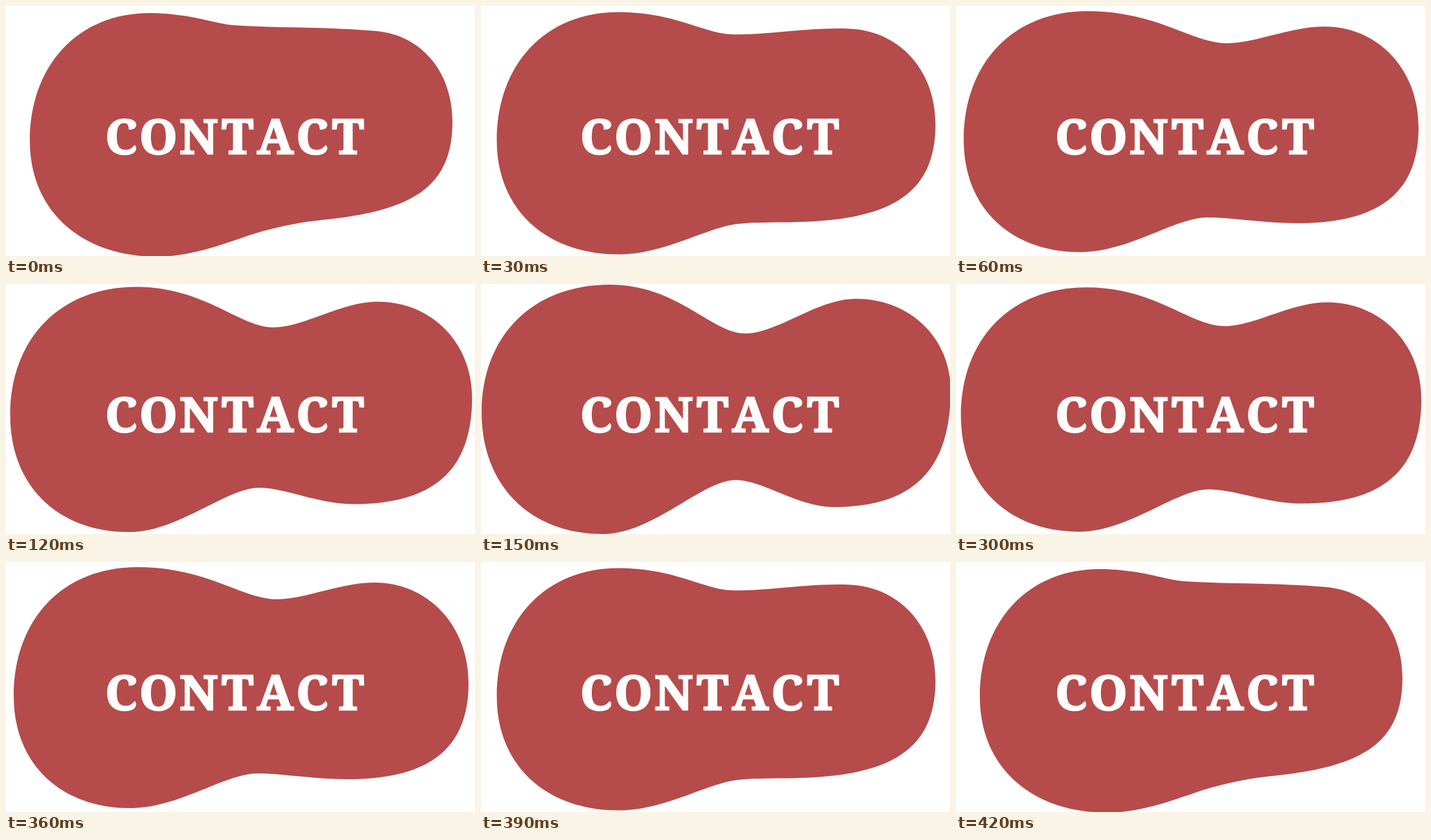
An HTML page that plays this animation: 728 px wide and 389 px high, repeating every 0.51 s.

```html
<!DOCTYPE html>
<html lang="en">
<head>
<meta charset="utf-8">
<title>Contact</title>
<style>
  html, body { margin: 0; width: 100%; height: 100%; overflow: hidden; background: #fff; }
  svg { display: block; width: 728px; height: 389px; }
  text {
    font: 900 75px "Noto Serif", serif; text-anchor: middle;
    fill: #fffefd; stroke: #fffefd; stroke-width: 2.4px;
  }
</style>
</head>
<body>
<svg viewBox="0 0 728 389">
  <path id="blob" fill="#b64b4b"/>
  <text x="179 236.5 299 359.5 418 475.5 531" y="230">CONTACT</text>
</svg>
<script>
const LOOP = 510, STEP = 30;
const blob = document.getElementById('blob');

// Clockwise from the left edge: travel direction, then how far the
// handles reach back and ahead as a share of the span to the neighbour.
const NODES = [
  { dir: [0, -1], back: .6, ahead: .6 },
  { dir: [1, 0], back: .6, ahead: .5 },
  { dir: [1, 0], back: .25, ahead: .29 },
  { dir: [1, 0], back: .35, ahead: .57 },
  { dir: [0, 1], back: .57, ahead: .68 },
  { dir: [-1, 0], back: .68, ahead: .37 },
  { dir: [-1, 0], back: .28, ahead: .25 },
  { dir: [-1, 0], back: .38, ahead: .6 }
];

// Relaxed, half pinched, fully pinched: x, y and an optional slope per node.
const POSES = [
  [[37, 210], [230, 11, .03], [355, 30, .07], [575, 39, .09], [693, 180], [490, 333, -.1], [400, 350, -.27], [235, 390]],
  [[12, 209], [204, 8], [421, 58], [572, 32], [718, 188], [530, 338], [390, 329], [193, 383]],
  [[1, 200], [200, 1], [410, 77], [582, 23], [729, 165], [548, 347], [395, 305], [189, 389]]
];

// Time in ms and position along the poses.
const KEYS = [[0, 0], [60, 1], [120, 1.5], [150, 2], [269, 2], [270, 1.6], [360, 1], [420, 0], [LOOP, 0]];

const mix = (a, b, k) => a + (b - a) * k;

function level(t) {
  const i = KEYS.findIndex(k => k[0] > t);
  const [t0, v0] = KEYS[i - 1], [t1, v1] = KEYS[i];
  return mix(v0, v1, (t - t0) / (t1 - t0));
}

function pose(v) {
  const i = Math.min(Math.floor(v), POSES.length - 2);
  return POSES[i].map((a, n) => {
    const b = POSES[i + 1][n];
    return [0, 1, 2].map(j => mix(a[j] || 0, b[j] || 0, v - i));
  });
}

// Control point of node n on the side of its neighbour m.
function handle(pts, n, m, share) {
  const [x, y, slope] = pts[n], [dx, dy] = NODES[n].dir;
  const d = share * ((pts[m][0] - x) * dx + (pts[m][1] - y) * dy);
  return [x + dx * d, y + (dy + dx * slope) * d];
}

function outline(pts) {
  const spans = pts.map((p, n) => {
    const m = (n + 1) % pts.length;
    const out = handle(pts, n, m, NODES[n].ahead);
    const back = handle(pts, m, n, NODES[m].back);
    return 'C' + [out, back, pts[m].slice(0, 2)].join(' ');
  });
  return 'M' + pts[0].slice(0, 2) + spans.join('') + 'Z';
}

function draw(now) {
  const t = Math.floor((now % LOOP) / STEP) * STEP;
  blob.setAttribute('d', outline(pose(level(t))));
}

function tick(now) {
  draw(now);
  requestAnimationFrame(tick);
}
draw(0);
requestAnimationFrame(tick);
</script>
</body>
</html>
```
